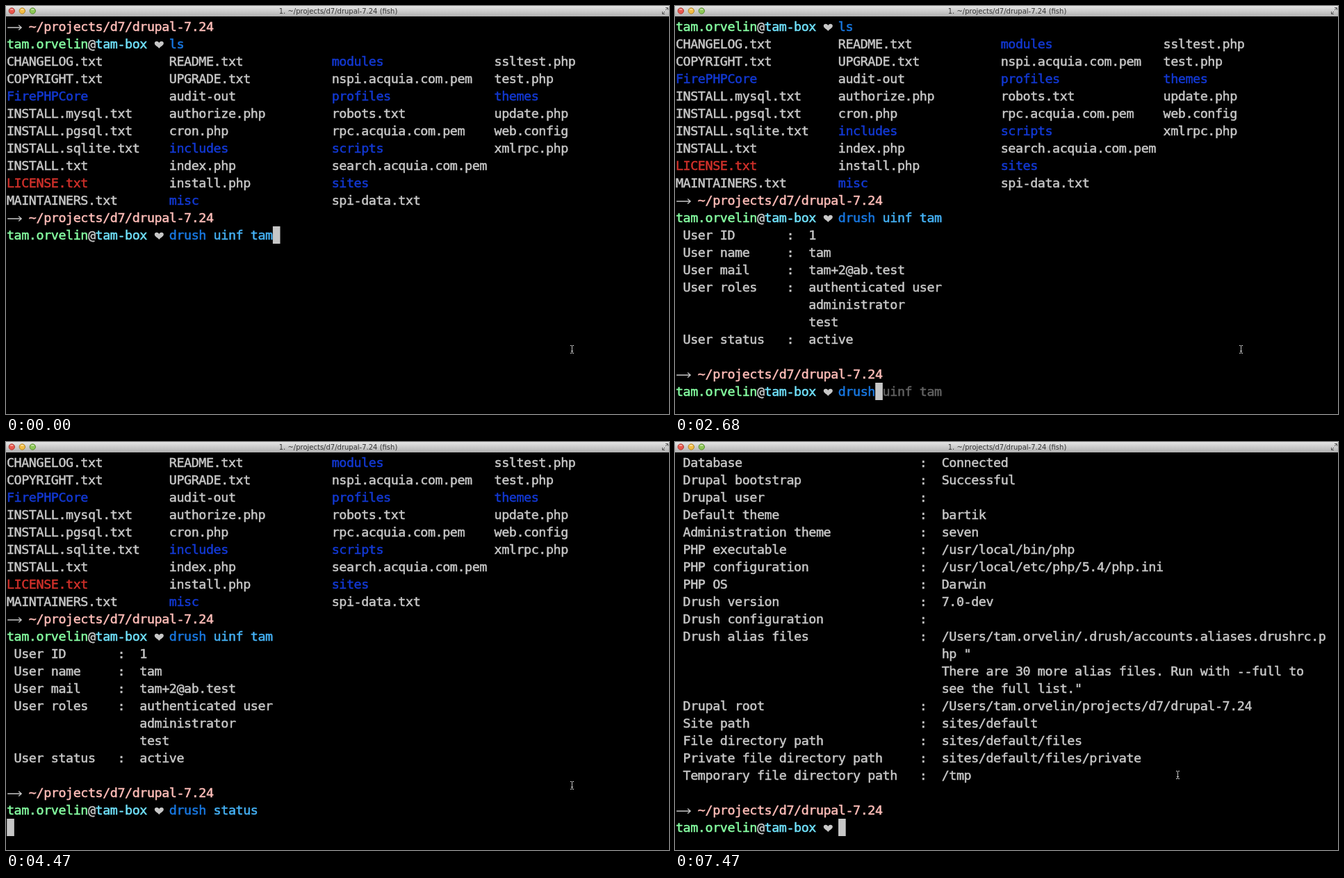
Write an HTML page with a canvas that moves like this. It is 954 px wide and 587 px high and loops after 8 s.

```html
<!DOCTYPE html>
<html lang="en">
<head>
<meta charset="utf-8">
<title>Terminal</title>
<style>
  html, body { margin: 0; width: 100%; height: 100%; overflow: hidden; background: #000; }
  canvas { display: block; }
</style>
</head>
<body>
<canvas id="stage" width="954" height="587"></canvas>
<script>
const ctx = document.getElementById('stage').getContext('2d');
const LOOP = 8000, LEFT = 1.2, TOP = 17, CELL = 10.63, ROW = 25;
const GREY = '#c7c7c7', BLUE = '#1238d2', RED = '#d0302a', PINK = '#ffbdb8', GREEN = '#86ffa2',
      CYAN = '#70e2fc', COMMAND = '#1878e2', PARAM = '#45b2f6', HINT = '#626262';

// A line is a list of runs: [column, text, colour].
const path = [[0, '→', GREY], [3, '~/projects/d7/drupal-7.24', PINK]];

function prompt(typed, hint = '') {
  const [command] = typed.split(' ');
  const known = command === 'drush' || command === 'ls';
  return [
    [0, 'tam.orvelin', GREEN], [11, '@', GREY], [12, 'tam-box', CYAN], [20, '♥', GREY],
    [22, command, known ? COMMAND : PINK],
    [22 + command.length, typed.slice(command.length), PARAM],
    [22 + typed.length, hint, HINT]
  ];
}

function listing() {
  const columns = [
    'CHANGELOG.txt COPYRIGHT.txt FirePHPCore/ INSTALL.mysql.txt INSTALL.pgsql.txt INSTALL.sqlite.txt INSTALL.txt LICENSE.txt MAINTAINERS.txt',
    'README.txt UPGRADE.txt audit-out authorize.php cron.php includes/ index.php install.php misc/',
    'modules/ nspi.acquia.com.pem profiles/ robots.txt rpc.acquia.com.pem scripts/ search.acquia.com.pem sites/ spi-data.txt',
    'ssltest.php test.php themes/ update.php web.config xmlrpc.php'
  ].map(names => names.split(' '));
  const colour = name => name.endsWith('/') ? BLUE : name === 'LICENSE.txt' ? RED : GREY;
  return columns[0].map((_, row) => columns
    .map((names, i) => [i * 22, names[row] || '', colour(names[row] || '')])
    .map(([col, name, c]) => [col, name.replace('/', ''), c]));
}

// Each row is "key|value"; rows without a key continue the value above.
function table(colon, rows) {
  return rows.map(row => {
    const [key, value] = row.split('|');
    return [[1, key, GREY], [colon, key && ':', GREY], [colon + 3, value, GREY]];
  });
}

const lines = [
  path, prompt('ls'), ...listing(),
  path, prompt('drush uinf tam'),
  ...table(15, ['User ID|1', 'User name|tam', 'User mail|tam+2@ab.test',
    'User roles|authenticated user', '|administrator', '|test', 'User status|active']),
  [], path, prompt('drush status'),
  ...table(33, ['Database|Connected', 'Drupal bootstrap|Successful', 'Drupal user|',
    'Default theme|bartik', 'Administration theme|seven',
    'PHP executable|/usr/local/bin/php', 'PHP configuration|/usr/local/etc/php/5.4/php.ini',
    'PHP OS|Darwin', 'Drush version|7.0-dev', 'Drush configuration|',
    'Drush alias files|/Users/tam.orvelin/.drush/accounts.aliases.drushrc.p', '|hp "',
    '|There are 30 more alias files. Run with --full to', '|see the full list."',
    'Drupal root|/Users/tam.orvelin/projects/d7/drupal-7.24', 'Site path|sites/default',
    'File directory path|sites/default/files',
    'Private file directory path|sites/default/files/private',
    'Temporary file directory path|/tmp']),
  [], path
];

// [time, first line, end line]: the visible part of the transcript.
const views = [[0, 0, 12], [150, 0, 13], [1500, 0, 21], [1650, 1, 22], [4470, 2, 23], [5970, 23, 44]];
// [time, typed text, suggestion]; null while a command runs.
const typing = [
  [0, 'drush uinf tam'], [150, null], [1650, ''],
  [2390, 'dr', 'ush uinf tam'], [2530, 'dru', 'sh uinf tam'],
  [2680, 'drush', ' uinf tam'], [2830, 'drush ', 'uinf tam'],
  [3130, 'drush st'], [3280, 'drush stat'], [3430, 'drush statu'], [3580, 'drush status'],
  [4030, 'drush statu'], [4170, 'drush stat'], [4320, 'drush statu'],
  [4470, null], [5970, '']
];
const processes = [[0, 'fish'], [1200, 'php'], [2240, 'fish'], [5070, 'php'], [7020, 'fish']];
const pointers = [[0, 812, 488], [7170, 804, 488], [7320, 722, 474], [7470, 721, 473]];

const at = (track, t) => track.findLast(step => step[0] <= t).slice(1);

function stroke(colour, width, ...polylines) {
  ctx.strokeStyle = colour;
  ctx.lineWidth = width;
  ctx.beginPath();
  for (const points of polylines) points.forEach(([x, y], i) => i ? ctx.lineTo(x, y) : ctx.moveTo(x, y));
  ctx.stroke();
}

function arrow(x, y) {
  stroke(GREY, 1.3, [[x + 1, y + 14], [x + 21, y + 14]],
    [[x + 17, y + 10.5], [x + 21, y + 14], [x + 17, y + 17.5]]);
}

function heart(x, y) {
  ctx.beginPath();
  ctx.moveTo(x + 6.5, y + 19);
  ctx.bezierCurveTo(x + 4.5, y + 16, x, y + 15, x, y + 11.5);
  ctx.bezierCurveTo(x, y + 8, x + 5, y + 7.6, x + 6.5, y + 11);
  ctx.bezierCurveTo(x + 8, y + 7.6, x + 13, y + 8, x + 13, y + 11.5);
  ctx.bezierCurveTo(x + 13, y + 15, x + 8.5, y + 16, x + 6.5, y + 19);
  ctx.fill();
}

function drawRun(row, [col, text, colour]) {
  const y = TOP + row * ROW;
  ctx.fillStyle = ctx.strokeStyle = colour;
  ctx.lineWidth = 0.5;
  [...text].forEach((char, i) => {
    const x = LEFT + (col + i) * CELL;
    if (char === '→') return arrow(x, y);
    if (char === '♥') return heart(x, y);
    ctx.fillText(char, x + CELL / 2, y + 19);
    ctx.strokeText(char, x + CELL / 2, y + 19);
  });
}

function drawTerminal(t) {
  const [first, end] = at(views, t);
  const [typed, hint = ''] = at(typing, t);
  const row = end - first;
  const col = typed === null ? 0 : 22 + typed.length;
  ctx.font = '18.4px "DejaVu Sans Mono", monospace';
  ctx.textAlign = 'center';
  lines.slice(first, end).forEach((line, i) => line.forEach(run => drawRun(i, run)));
  if (typed !== null) prompt(typed, hint).forEach(run => drawRun(row, run));
  ctx.fillStyle = GREY;
  ctx.fillRect(LEFT + col * CELL, TOP + row * ROW, CELL, ROW);
  drawRun(row, [col, hint.slice(0, 1), '#000']);
}

function drawTitleBar(t) {
  const shade = ctx.createLinearGradient(0, 0, 0, 15);
  shade.addColorStop(0, '#e6e6e6');
  shade.addColorStop(1, '#b0b0b0');
  ctx.fillStyle = shade;
  ctx.fillRect(0, 0, 954, 15);

  [['#e8574d', '#a3332c'], ['#f2bd45', '#a87a20'], ['#8cc757', '#4f8427']].forEach(([fill, edge], i) => {
    const x = 8.3 + i * 15;
    ctx.beginPath();
    ctx.arc(x, 7, 4.2, 0, Math.PI * 2);
    ctx.fillStyle = fill;
    ctx.fill();
    ctx.strokeStyle = edge;
    ctx.lineWidth = 0.9;
    ctx.stroke();
    ctx.fillStyle = 'rgba(255,255,255,.45)';
    ctx.fillRect(x - 2, 4, 4, 2);
  });

  ctx.font = '10px "DejaVu Sans", sans-serif';
  ctx.fillStyle = '#333';
  ctx.fillText(`1. ~/projects/d7/drupal-7.24 (${at(processes, t)[0]})`, 478, 10.5);

  stroke('#555', 1, [[949, 6], [952, 3]], [[949, 2.5], [952.5, 2.5], [952.5, 6]],
    [[948, 8], [945, 11]], [[944.5, 8], [944.5, 11.5], [948, 11.5]]);
}

function drawPointer(t) {
  const [x, y] = at(pointers, t);
  stroke('#c4c4c4', 1, [[x + 2.5, y + 1], [x + 2.5, y + 11]],
    [[x, y + 0.5], [x + 2, y + 0.5]], [[x + 3, y + 0.5], [x + 5, y + 0.5]],
    [[x, y + 11.5], [x + 2, y + 11.5]], [[x + 3, y + 11.5], [x + 5, y + 11.5]],
    [[x + 1, y + 8.5], [x + 4, y + 8.5]]);
}

function frame() {
  const t = performance.now() % LOOP;
  ctx.fillStyle = '#000';
  ctx.fillRect(0, 0, 954, 587);
  drawTerminal(t);
  drawTitleBar(t);
  drawPointer(t);
  requestAnimationFrame(frame);
}
frame();
</script>
</body>
</html>
```
